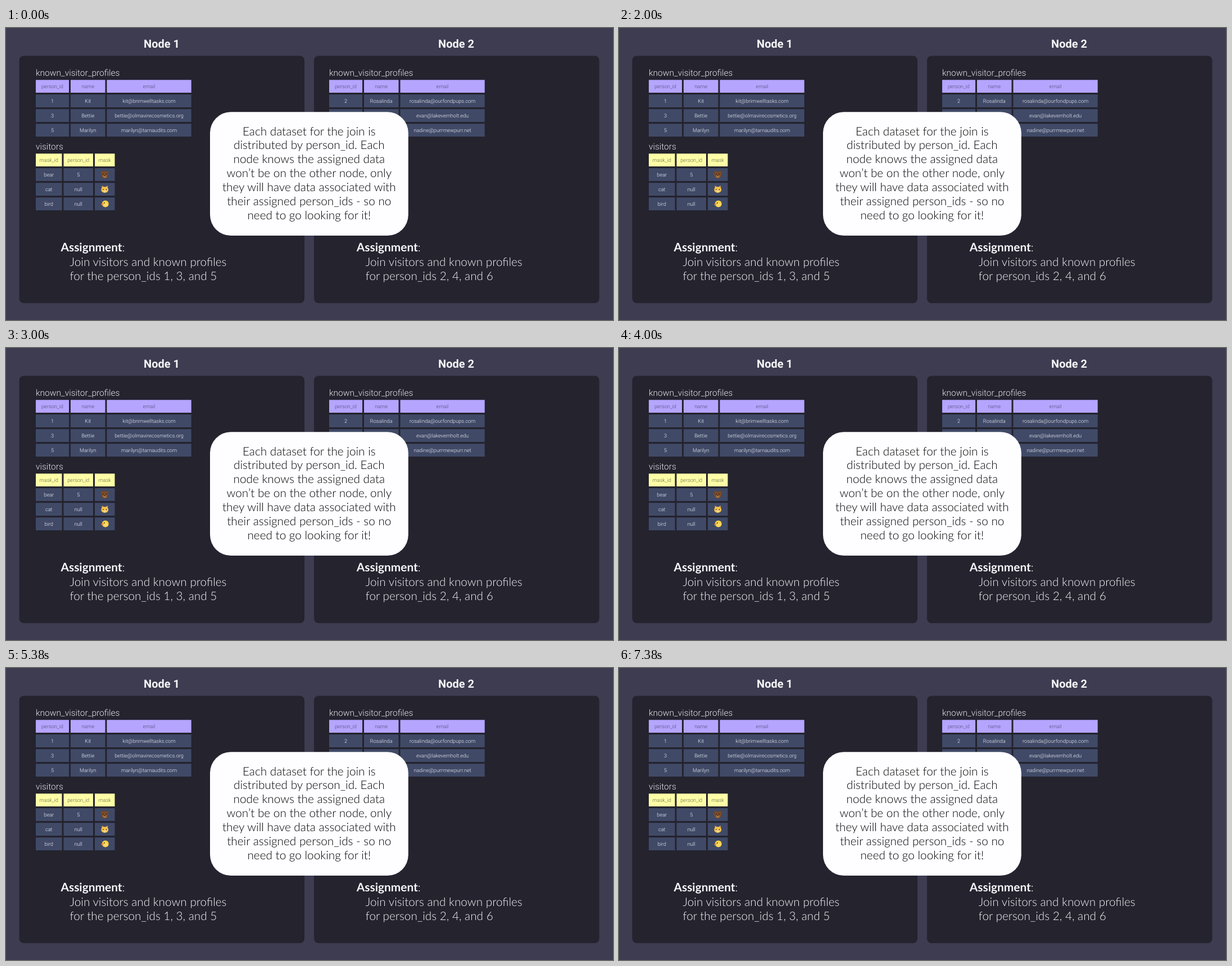
An HTML page with a canvas that plays this animation: 1080x519 px, repeating every 8 s.

```html
<!DOCTYPE html>
<html lang="en">
<head>
<meta charset="utf-8">
<title>Distributed join</title>
<style>
  html, body { margin: 0; width: 100%; height: 100%; overflow: hidden; background: #3d3c50; }
  canvas { display: block; width: 1080px; height: 519px; }
</style>
</head>
<body>
<canvas id="stage" width="1080" height="519"></canvas>
<script>
const ctx = document.getElementById('stage').getContext('2d');
ctx.textRendering = 'geometricPrecision'; // fractional glyph advances
ctx.fontKerning = 'normal';

const LIGHT = '300 20.75px Lato, sans-serif';
const BOLD = '700 20.9px Lato, sans-serif';
const ROBOTO = 'Roboto, sans-serif';
const ROW_H = 22.8, ROW_STEP = 26;
const PURPLE = { fill: '#b5a5fe', ink: '#514a78' };
const YELLOW = { fill: '#fdfda6', ink: '#66654a' };

function rect(x, y, w, h, fill, r = 0) {
  ctx.fillStyle = fill;
  ctx.beginPath();
  ctx.roundRect(x, y, w, h, r);
  ctx.fill();
}

function text(str, x, y, font, fill, align = 'left') {
  ctx.font = font;
  ctx.fillStyle = fill;
  ctx.textAlign = align;
  ctx.fillText(str, x, y);
}

function ellipse(x, y, rx, ry, fill) {
  ctx.fillStyle = fill;
  ctx.beginPath();
  ctx.ellipse(x, y, rx, ry, 0, 0, Math.PI * 2);
  ctx.fill();
}

function poly(points, fill) {
  ctx.fillStyle = fill;
  ctx.beginPath();
  points.forEach(([x, y]) => ctx.lineTo(x, y));
  ctx.closePath();
  ctx.fill();
}

// Small animal faces, drawn around 0,0
const masks = {
  bear() {
    for (const s of [-1, 1]) {
      ellipse(s * 4.5, -4.4, 2.2, 2.2, '#70411f');
      ellipse(s * 4.5, -4.2, 1, 1, '#9a6434');
    }
    ellipse(0, 0.5, 6.2, 6.2, '#7d4a25');
    ellipse(0, 3, 2.8, 2.5, '#b5844f');
    ellipse(0, 2, 1.5, 1, '#2b1a14');
    for (const s of [-1, 1]) ellipse(s * 2.5, -0.8, 0.8, 0.9, '#2b1a14');
  },
  cat() {
    for (const s of [-1, 1]) {
      poly([[s * 5, -6.3], [s * 5.7, 0], [s * 0.8, -3.5]], '#efb340');
      poly([[s * 4.5, -4.6], [s * 4.6, -1.8], [s * 2.6, -3.4]], '#e0935a');
    }
    ellipse(0, 1, 6.4, 5.3, '#f6c44e');
    ellipse(0, 3.2, 2.4, 1.7, '#fbe3a4');
    ellipse(0, 2.2, 0.8, 0.6, '#dc776c');
    for (const s of [-1, 1]) ellipse(s * 2.8, 0.3, 0.8, 1, '#3d2c1d');
  },
  bird() {
    ellipse(1, 0, 6, 6, '#fbd048');
    ellipse(2.4, 1.6, 3.4, 3.3, '#fddb66');
    poly([[-7.2, 1.2], [-3.2, -1.3], [-2.6, 2.8]], '#ee8733');
    ellipse(-0.9, -1.6, 0.9, 1.1, '#332418');
  }
};

// cols: [left, width] pairs; rows: cell strings under the header
function table(x, y, title, theme, cols, head, rows) {
  text(title, x, y - 7.8, `300 15.5px ${ROBOTO}`, '#e6e6ec');
  [head, ...rows].forEach((row, i) => cols.forEach(([left, w], c) => {
    const cx = x + left, cy = y + i * ROW_STEP, value = row[c];
    rect(cx, cy, w, ROW_H, i ? '#404a67' : theme.fill);
    const mid = cx + w / 2;
    if (masks[value] && c === 2) {
      ctx.save();
      ctx.translate(mid, cy + 11.3);
      masks[value]();
      ctx.restore();
    } else {
      text(value, mid, cy + 14.5, `300 9.2px ${ROBOTO}`, i ? '#f0f1f6' : theme.ink, 'center');
    }
  }));
}

function panel(x, mid, name) {
  text(name, mid, 35, `700 20px ${ROBOTO}`, '#f5f5f8', 'center');
  rect(x, 49.5, 507.5, 439.5, '#24232e', 8);
}

function assignment(x, ids) {
  const ink = '#f7f7fa';
  text('Assignment', x, 397.3, BOLD, ink);
  text(':', x + ctx.measureText('Assignment').width, 397.3, LIGHT, ink);
  text('Join visitors and known profiles', x + 16, 422.8, LIGHT, ink);
  text(ids, x + 16, 447.8, LIGHT, ink);
}

const profileCols = [[0, 59], [62, 61.5], [126.5, 150.2]];
const profileHead = ['person_id', 'name', 'email'];
const visitorCols = [[0, 46.5], [49.5, 52.5], [105, 35.5]];

const message = [
  'Each dataset for the join is',
  'distributed by person_id. Each',
  'node knows the assigned data',
  'won’t be on the other node, only',
  'they will have data associated with',
  'their assigned person_ids - so no',
  'need to go looking for it!'
];

function bubble() {
  rect(363, 149.3, 352.8, 219.7, '#fefdff', 37);
  message.forEach((line, i) =>
    text(line, 539.3, 190.6 + i * 24.85, LIGHT, '#000', 'center'));
}

function draw() {
  rect(0, 0, 1080, 519, '#3d3c50');
  panel(23.5, 277, 'Node 1');
  panel(548, 801, 'Node 2');

  table(53, 92.3, 'known_visitor_profiles', PURPLE, profileCols, profileHead, [
    ['1', 'Kit', 'kit@brimwelltasks.com'],
    ['3', 'Bettie', 'bettie@olmavirecosmetics.org'],
    ['5', 'Marilyn', 'marilyn@tarnaudits.com']
  ]);
  table(53, 223.3, 'visitors', YELLOW, visitorCols, ['mask_id', 'person_id', 'mask'], [
    ['bear', '5', 'bear'],
    ['cat', 'null', 'cat'],
    ['bird', 'null', 'bird']
  ]);
  table(575, 92.3, 'known_visitor_profiles', PURPLE, profileCols, profileHead, [
    ['2', 'Rosalinda', 'rosalinda@ourfondpups.com'],
    ['4', '', 'evan@lakevernholt.edu'],
    ['6', '', 'nadine@purrmewpurr.net']
  ]);

  assignment(97.5, 'for the person_ids 1, 3, and 5');
  assignment(623.8, 'for person_ids 2, 4, and 6');
  bubble();
}

// The scene holds still for the whole loop
function tick() {
  draw();
  requestAnimationFrame(tick);
}
tick();
</script>
</body>
</html>
```
